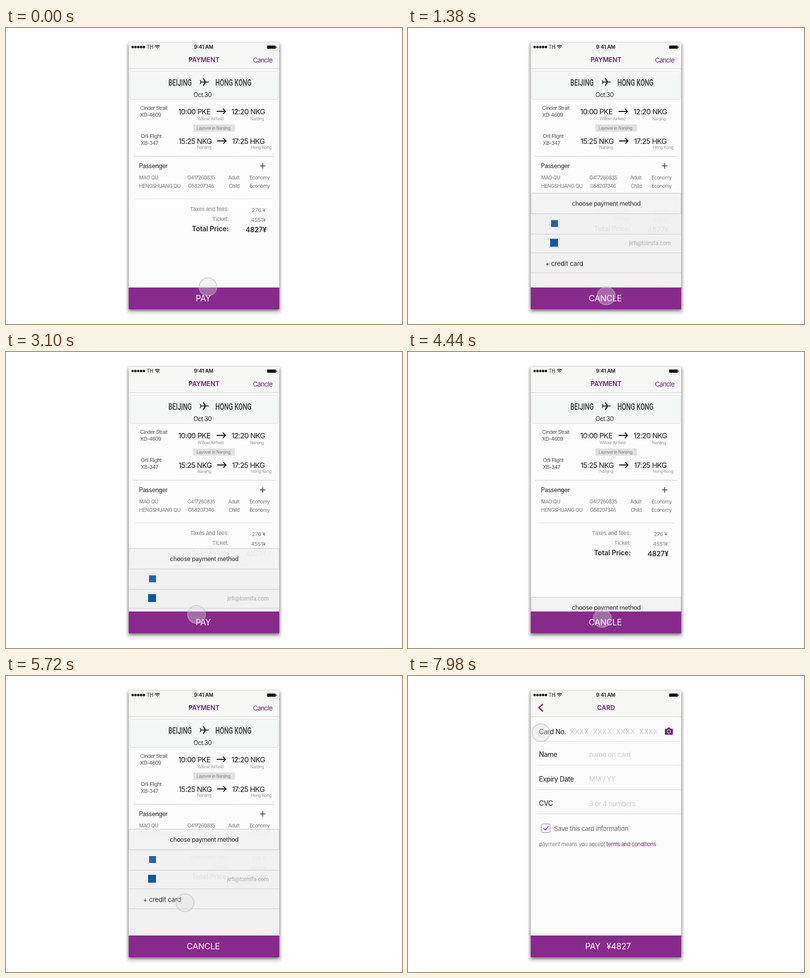
Recreate the animation shown at these times as an HTML page. Size 800 px wide and 600 px high, loop 8 s.

```html
<!DOCTYPE html>
<html lang="en">
<head>
<meta charset="utf-8">
<title>Payment flow</title>
<style>
html, body { margin: 0; width: 100%; height: 100%; overflow: hidden; background: #fff; }
svg { display: block; width: 800px; height: 600px; font-family: Inter, Roboto, sans-serif; }
text { fill: #2b2b2b; white-space: pre; }
.mid { text-anchor: middle; }
.end { text-anchor: end; }
.line { fill: none; stroke: #c8c8c8; }
.dotted { stroke-dasharray: 1.5 1.5; }
.purple { fill: #882a8b; }

.title { font-size: 13px; font-weight: 600; fill: #6a2673; letter-spacing: -.01em; }
.action { font-size: 13px; fill: #6a2673; letter-spacing: -.045em; }
.city { font: 500 19px Roboto, sans-serif; fill: #333; }
.date { font-size: 12.5px; letter-spacing: -.04em; }
.flight { font-size: 10.5px; fill: #555; letter-spacing: -.05em; }
.leg { font-size: 15px; fill: #1c1c1c; letter-spacing: -.05em; }
.place { font-size: 8.5px; fill: #979797; letter-spacing: -.04em; }
.person { font-size: 10px; fill: #777; letter-spacing: -.045em; }
.fee { font-size: 11px; fill: #808080; letter-spacing: -.02em; }
.total { font-size: 14px; font-weight: 600; letter-spacing: -.01em; }
.button { font-size: 17px; fill: #fff; letter-spacing: -.02em; }
.choose { font-size: 12.5px; letter-spacing: -.03em; }
.credit { font-size: 13px; letter-spacing: -.01em; }
.field { font-size: 14px; fill: #1c1c1c; letter-spacing: -.035em; }
.hint { font-size: 14px; font-weight: 300; fill: #c4c4c4; letter-spacing: -.035em; }
.mask { letter-spacing: .03em; }
.save { font-size: 13px; fill: #6c6c6c; letter-spacing: -.03em; }
.terms { font-size: 11px; fill: #8a8a8a; letter-spacing: -.04em; }

#sheet { animation: sheet 8s ease infinite; }
#pay { animation: pay 8s step-end infinite; }
#cancel { animation: cancel 8s step-end infinite; }
#card { animation: card 8s linear infinite; }
#touch { animation: touch 8s ease-in-out infinite; }

@keyframes sheet {
  0%, 11.87% { transform: translateY(571px); }
  20.37%, 36.91% { transform: translateY(310px); }
  45.41%, 53.85% { transform: translateY(571px); }
  62.35%, 100% { transform: translateY(310px); }
}
@keyframes pay {
  0% { opacity: 1; }
  12.25% { opacity: 0; }
  37% { opacity: 1; }
  54.25%, 100% { opacity: 0; }
}
@keyframes cancel {
  0% { opacity: 0; }
  12.25% { opacity: 1; }
  37% { opacity: 0; }
  54.25%, 100% { opacity: 1; }
}
@keyframes card {
  0%, 79.75% { opacity: 0; }
  84%, 100% { opacity: 1; }
}
@keyframes touch {
  0% { transform: translate(408px, 524.5px); animation-timing-function: ease-out; }
  5.5%, 18.5% { transform: translate(400.5px, 543px); animation-timing-function: ease-in; }
  22.4% { transform: translate(395px, 533px); animation-timing-function: ease-out; }
  28.75%, 32.75% { transform: translate(382.5px, 521px); }
  37.75%, 38.75% { transform: translate(385px, 532px); }
  43% { transform: translate(385px, 535px); }
  46.25%, 65.5% { transform: translate(392.5px, 540px); animation-timing-function: ease-in; }
  71.5% { transform: translate(362px, 460px); animation-timing-function: ease-out; }
  74.25%, 75% { transform: translate(312px, 397px); }
  78.25%, 88.75% { transform: translate(308px, 450px); animation-timing-function: ease-in; }
  95% { transform: translate(292px, 215px); animation-timing-function: ease-out; }
  99.5%, 100% { transform: translate(268.5px, 115px); }
}
</style>
</head>
<body>
<svg viewBox="0 0 800 600">
  <defs>
    <clipPath id="screen"><path d="M248 30H552V570H248Z"/></clipPath>
    <path id="arrow" d="M0 0H18M12.5-5.5 18 0 12.5 5.5" fill="none" stroke="#111" stroke-width="1.8"/>
  </defs>

  <!-- phone body -->
  <rect x="242.5" y="27.5" width="315" height="554" rx="9" fill="#f3f3f3"/>
  <rect x="248" y="30" width="304" height="540" fill="#fff" style="filter: drop-shadow(0 3px 3px rgba(0,0,0,.6))"/>

  <g clip-path="url(#screen)">
    <rect x="248" y="30" width="304" height="540" fill="#fdfdfd"/>
    <rect x="248" y="30" width="304" height="52" fill="#f7f7f6"/>
    <path class="line" d="M248 82.5H552"/>
    <text class="title mid" x="400" y="69">PAYMENT</text>
    <text class="action" x="499" y="70">Cancle</text>

    <!-- trip -->
    <rect x="249.5" y="87.5" width="301" height="57.5" rx="3" fill="#f5f7f7" stroke="#dcdede"/>
    <text class="city mid" transform="translate(351.5 117) scale(.67 1)">BEIJING</text>
    <text class="city mid" transform="translate(459.5 117) scale(.67 1)">HONG KONG</text>
    <path fill="#3a3a3a" d="M391.5 105h1.1l2.7 3.6h4.9l-2.6-7h1.4l5.4 7h3.600q2 .1 2 .9t-2 .9h-3.600l-5.400 7h-1.400l2.600-7h-4.900l-2.700 3.600h-1.100l1.200-4.500z"/>
    <text class="date mid" x="397" y="139.5">Oct.30</text>

    <text class="flight" x="271" y="166">Cinder Strait</text>
    <text class="flight" x="271" y="180">XD-4609</text>
    <text class="leg" x="348" y="174.5">10:00 PKE</text>
    <use href="#arrow" x="425.5" y="169"/>
    <text class="leg" x="455.5" y="174.5">12:20 NKG</text>
    <text class="place" x="387" y="187">Willow Airfield</text>
    <text class="place" x="493" y="187">Nanjing</text>

    <rect x="378.5" y="195.5" width="84" height="14.5" fill="#e1e1e1"/>
    <text class="place mid" x="419" y="206" style="fill:#808080">Layover in Nanjing</text>

    <text class="flight" x="272.5" y="222.5">Orli Flight</text>
    <text class="flight" x="272.5" y="236.5">XB-347</text>
    <text class="leg" x="348.5" y="234.5">15:25 NKG</text>
    <use href="#arrow" x="426.5" y="229"/>
    <text class="leg" x="456.5" y="234.5">17:25 HKG</text>
    <text class="place" x="386.5" y="245">Nanjing</text>
    <text class="place" x="494.5" y="245">Hong Kong</text>
    <path class="line dotted" d="M257 260H543" style="stroke:#8c8c8c"/>

    <!-- passengers -->
    <text class="date" x="268.5" y="283.5">Passenger</text>
    <path d="M513 279.5H524M518.5 274V285" stroke="#333" stroke-width="1.5"/>
    <text class="person" x="269" y="307">MAO QU</text>
    <text class="person" x="366.5" y="307">G417260835</text>
    <text class="person" x="449" y="307">Adult</text>
    <text class="person" x="492" y="307">Economy</text>
    <text class="person" x="269" y="324">HENGSHUANG QU</text>
    <text class="person" x="368" y="324">G58207346</text>
    <text class="person" x="450" y="324">Child</text>
    <text class="person" x="492" y="324">Economy</text>
    <path class="line dotted" d="M261 346.5H538"/>

    <!-- price -->
    <text class="fee end" x="450" y="371">Taxes and fees:</text>
    <text class="fee" x="496.5" y="372.5">276 ¥</text>
    <text class="fee end" x="450" y="391">Ticket:</text>
    <text class="fee" x="495" y="392.5">4551¥</text>
    <text class="total end" x="450" y="412">Total Price:</text>
    <text class="total" x="484" y="413.5">4827¥</text>

    <!-- payment methods -->
    <g id="sheet">
      <rect x="248" width="304" height="261" fill="#f1f1f1" fill-opacity=".94"/>
      <rect x="248.5" y=".5" width="303" height="41.5" fill="#f5f5f5" fill-opacity=".4" stroke="#cdcdcd" stroke-width="1.2"/>
      <path class="line" d="M248 83.5H552M248 121.5H552M248 162H552"/>
      <text class="choose mid" x="400.5" y="26">choose payment method</text>
      <rect x="289" y="55" width="14" height="14" fill="#2d60ad"/>
      <rect x="287" y="93" width="16" height="16" fill="#12589f"/>
      <text class="fee end" x="530.5" y="106" style="fill:#aaa">jirfl@tolmifa.com</text>
      <text class="credit" x="277" y="148">+ credit card</text>
    </g>

    <rect class="purple" x="248" y="526" width="304" height="44"/>
    <text id="pay" class="button mid" x="398.5" y="554">PAY</text>
    <text id="cancel" class="button mid" x="398.5" y="554">CANCLE</text>

    <!-- card form -->
    <g id="card">
      <rect x="248" y="30" width="304" height="540" fill="#fcfcfc"/>
      <rect x="248" y="30" width="304" height="52" fill="#f7f7f6"/>
      <path class="line" d="M248 82.5H552"/>
      <path d="M272.5 57 264.5 64.5 272.5 72" fill="none" stroke="#63276c" stroke-width="2.4"/>
      <text class="title mid" x="400" y="69">CARD</text>

      <text class="field" x="264.5" y="118">Card No.</text>
      <text class="hint mask" x="327" y="118">XXXX</text>
      <text class="hint mask" x="373.5" y="118">XXXX</text>
      <text class="hint mask" x="420" y="118">XXXX</text>
      <text class="hint mask" x="467" y="118">XXXX</text>
      <path fill="#63276c" d="M520 107h3.5l1.5-2.5h4l1.5 2.5h3.5q1 0 1 1v10q0 1-1 1h-14q-1 0-1-1v-10q0-1 1-1z"/>
      <circle cx="527" cy="112.5" r="3.4" fill="none" stroke="#eadcec" stroke-width="1.2"/>

      <text class="field" x="264.5" y="164">Name</text>
      <text class="hint" x="366" y="164">name on card</text>
      <text class="field" x="264.5" y="213.5">Expiry Date</text>
      <text class="hint" x="366" y="214">MM / YY</text>
      <text class="field" x="264.5" y="263">CVC</text>
      <text class="hint" x="366" y="263.5">3 or 4 numbers</text>
      <path class="line dotted" d="M260 132.5H552"/>
      <path class="line" d="M260 181H552M260 230.5H552M260 279.5H552" style="stroke:#dcdcdc"/>

      <rect x="269.5" y="300" width="17.5" height="17.5" rx="3" fill="#fff" stroke="#a566a8"/>
      <path d="M273.5 308.5 277 312.5 283.5 305" fill="none" stroke="#882a8b" stroke-width="1.3"/>
      <text class="save" x="295" y="313.5">Save this card information</text>
      <text class="terms" x="265" y="345">payment means you accept <tspan class="purple">terms and conditions</tspan></text>

      <rect class="purple" x="248" y="526" width="304" height="44"/>
      <text class="button" x="358" y="554">PAY</text>
      <text class="button" x="401" y="554">¥4827</text>
    </g>

    <!-- status bar -->
    <path d="M255.8 38.5h23" stroke="#111" stroke-width="5" stroke-linecap="round" stroke-dasharray="0 5.7"/>
    <text x="284" y="42" style="font-size:10px;letter-spacing:-.03em">TH</text>
    <path d="M301.3 37q4.7-4 9.4 0M303.2 39.2q2.8-2.4 5.6 0" fill="none" stroke="#111" stroke-width="1.5"/>
    <path d="M304.8 40.5h2.4L306 42z" fill="#111"/>
    <text class="mid" x="399.5" y="42" style="font-size:10px;font-weight:600;fill:#111">9:41 AM</text>
    <rect x="527.5" y="35.5" width="17.5" height="6.5" rx="1.2" fill="#111"/>
    <rect x="545.8" y="37.3" width="1.4" height="3" rx=".6" fill="#111"/>

    <circle id="touch" r="18" fill="#dedede" fill-opacity=".36" stroke="#bcbcbc" stroke-opacity=".55" stroke-width="2"/>
  </g>
</svg>
</body>
</html>
```
